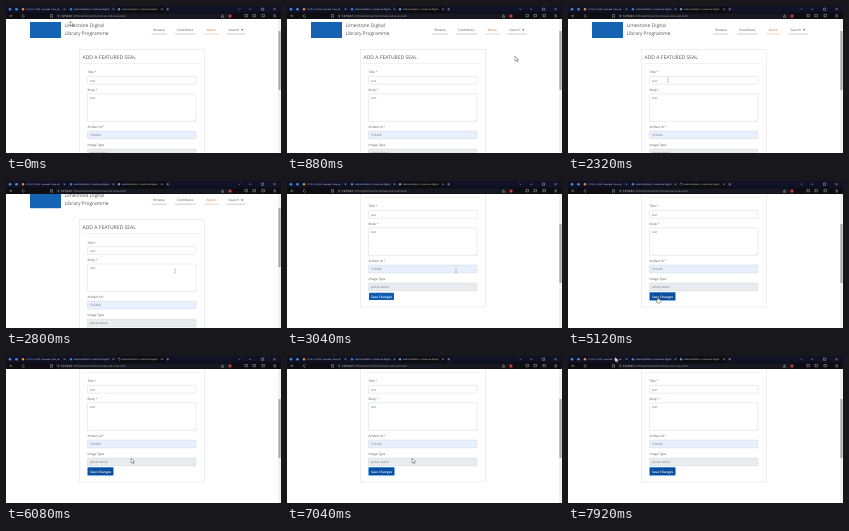
An HTML page that plays this animation: 275x147 px, repeating every 8000 ms.

```html
<!DOCTYPE html>
<html lang="en">
<head>
<meta charset="utf-8">
<title>Add a featured seal</title>
<style>
  html, body { margin: 0; width: 100%; height: 100%; overflow: hidden; background: #fff; }
  svg { display: block; width: 100vw; height: 100vh; }
  text { font-family: "Open Sans", "Noto Sans", sans-serif; text-rendering: geometricPrecision; white-space: pre; }
</style>
</head>
<body>
<svg viewBox="0 0 275 147">
  <clipPath id="view"><rect y="13" width="275" height="134"/></clipPath>
  <rect width="275" height="147" fill="#fff"/>
  <g clip-path="url(#view)"><g id="page"></g></g>
  <g id="chrome"></g>
  <g id="pointer">
    <path id="arrow" d="M0 0V5L1.2 4L2 5.8L2.8 5.4L2 3.7H3.6Z" fill="#fff" stroke="#333" stroke-width=".4"/>
    <path id="beam" d="M-.8-2H.8M0-2V2M-.8 2H.8" fill="none" stroke="#777" stroke-width=".35"/>
    <path id="hand" d="M-.6 0H.5V2L2.6 2.6V4.4L1.9 6H-.9L-2 3.5L-1.4 3L-.6 3.7Z" fill="#fff" stroke="#222" stroke-width=".4"/>
  </g>
</svg>
<script>
const $ = id => document.getElementById(id);
const page = $('page'), chrome = $('chrome');
const LOOP = 8000, STEP = 80;

function add(parent, tag, attrs, content) {
  const el = document.createElementNS('http://www.w3.org/2000/svg', tag);
  for (const k in attrs) el.setAttribute(k, attrs[k]);
  if (content) el.textContent = content;
  return parent.appendChild(el);
}
const rect = (g, x, y, width, height, fill, more) => add(g, 'rect', { x, y, width, height, fill, ...more });
const text = (g, x, y, size, fill, str, more) => add(g, 'text', { x, y, 'font-size': size, fill, ...more }, str);
const line = (g, d, stroke, w = .4) => add(g, 'path', { d, stroke, 'stroke-width': w, fill: 'none' });
const dot = (g, cx, cy, r, fill) => add(g, 'circle', { cx, cy, r, fill });

// Page header
rect(page, 24, 16, 31, 16, '#1763b3');
text(page, 58.5, 21, 4.9, '#555', 'Limestone Digital');
text(page, 58.5, 28.6, 4.9, '#555', 'Library Programme');
function navItem(label, x, w, color = '#555') {
  text(page, x, 25, 3.25, color, label);
  line(page, `M${x - 2} 28H${x + w + 2}`, color, .3);
}
navItem('Browse', 147.5, 11);
navItem('Contribute', 171, 17);
navItem('About', 200.5, 10, '#c8681e');
navItem('Search', 222.5, 15);
add(page, 'path', { d: 'M235 23.3H237.4L236.2 24.7Z', fill: '#555' });

// Form card
rect(page, 73.5, 43.5, 125, 123.5, '#fff', { stroke: '#ddd', 'stroke-width': .5 });
text(page, 76.5, 53, 5.05, '#555', 'ADD A FEATURED SEAL');
line(page, 'M76.5 57.5H194', '#ddd');

const inputs = [];
function field(label, y, h, value, fill = '#fff') {
  const t = text(page, 81.5, y - 3, 3.15, '#555', label);
  rect(page, 81.5, y, 108.5, h, fill, { rx: .6, stroke: '#c9ced4', 'stroke-width': .4 });
  text(page, 84, y + 5.2, 3.1, '#6c757d', value);
  if (label === 'Image Type') return;
  add(t, 'tspan', { fill: '#c46a6a' }, ' *');
  inputs.push([y, y + h]);
}
field('Title', 70.4, 7.8, 'test');
field('Body', 87.9, 27.5, 'test');
line(page, 'M188.2 114.7L189.5 113.4', '#999', .3);
field('Artifact Id', 125, 7.8, '532440', '#e8f0fe');
field('Image Type', 143, 7.8, 'photo detail', '#e9ecef');

const ring = rect(page, 81.2, 152, 26.6, 8.7, '#4c9be8', { rx: 1 });
const button = rect(page, 82, 152.8, 25, 7.1, '#0f5bb0', { rx: .5 });
text(page, 84, 157.5, 3.2, '#fff', 'Save Changes', { 'font-weight': 600 });

// Browser frame
rect(chrome, 0, 0, 275, 13, '#101228');
rect(chrome, 110, .4, 49, 7, '#0d0d12', { rx: 1 });
rect(chrome, 0, 6.5, 275, 6.5, '#0d0d12');
rect(chrome, 50, 7.4, 176, 5, '#181920', { rx: 1 });
const close = (x, r = .8) =>
  line(chrome, `M${x - r} ${3.2 - r}l${2 * r} ${2 * r}M${x - r} ${3.2 + r}l${2 * r} ${-2 * r}`, '#ddd');
function tab(x, color, title, size, end) {
  const mark = dot(chrome, x, 3.2, 1.2, color);
  text(chrome, x + 3, 4.1, size, '#eee', title);
  close(end);
  return mark;
}
const appTitle = 'AdminArtefacts - Limestone Digital';
for (const x of [4, 10.5]) dot(chrome, x, 3.2, 1.3, '#4a8fd8');
tab(17, '#e8932c', '127.0.0.1:2355 / mariadb / lime_db', 2.1, 58.5);
tab(65, '#3f83cf', appTitle, 2.2, 107.5);
const icon = tab(113, '#5c9bdc', appTitle, 2.2, 156);
const spinner = line(chrome, 'M113 2A1.2 1.2 0 1 1 111.8 3.2', '#8cb8ee', .5);
close(268.5, 1.1);
line(chrome, 'M160.5 3.2H163M161.75 2V4.4M232.5 2.6L233.5 3.6L234.5 2.6M243 3.2H245.4M255.5 2.1H257.7V4.3H255.5Z', '#ddd');
line(chrome, 'M6.5 9.9H3.8L5 8.7M3.8 9.9L5 11.1M18.5 9.1A1.3 1.3 0 1 0 18.7 10.4M44.5 8.5H46.5V11.5L45.5 10.6L44.5 11.5Z', '#ccc');
line(chrome, 'M215.5 9.5V11.3H217.5V9.5M216.5 10.4V8.3M267.5 8.9H270M267.5 9.9H270M267.5 10.9H270', '#ccc');
dot(chrome, 52.3, 9.9, .7, '#aaa');
dot(chrome, 224, 9.9, 1.5, '#d83b35');
for (const x of [239, 247, 256]) rect(chrome, x, 8.7, 2.2, 2.2, 'none', { stroke: '#ccc', 'stroke-width': .4 });
const url = text(chrome, 55, 10.9, 2.75, '#fff', '127.0.0.1');
add(url, 'tspan', { fill: '#9a9ca2' }, ':2354/admin/artifacts/featured-seals/add');
rect(chrome, 272, 13, 3, 134, '#f1f1f1');
const thumb = rect(chrome, 272.4, 25, 2.2, 59, '#aaa');

// Pointer moves: start, end, x, y
const moves = [
  [80, 880, 228, 50], [2080, 2320, 100, 74], [2320, 2800, 169, 90],
  [3440, 4240, 90, 116], [5440, 5840, 125, 102], [7120, 7920, 47, 1]
];

function ease(t, from, to) {
  const u = Math.min(1, Math.max(0, (t - from) / (to - from)));
  return u * u * (3 - 2 * u);
}
const show = (el, on) => el.setAttribute('visibility', on ? 'visible' : 'hidden');

function draw(t) {
  let x = 64, y = 15;
  for (const [from, to, mx, my] of moves) {
    const k = ease(t, from, to);
    x += (mx - x) * k;
    y += (my - y) * k;
  }
  const scroll = 41 * ease(t, 2735, 3040), py = y + scroll;
  page.setAttribute('transform', `translate(0 ${-scroll})`);
  thumb.setAttribute('y', 25 + scroll * .44);

  const hand = x > 82 && x < 107 && py > 152.5 && py < 160.5;
  const beam = x > 81.5 && x < 190 && inputs.some(([top, bottom]) => py > top && py < bottom);
  $('pointer').setAttribute('transform', `translate(${x} ${y})`);
  show($('hand'), hand);
  show($('beam'), beam);
  show($('arrow'), !hand && !beam);

  const clicked = t >= 4800;
  show(ring, clicked);
  button.setAttribute('fill', hand || clicked ? '#0b4f9e' : '#0f5bb0');

  const loading = t >= 5040 && t < 6960;
  show(icon, !loading);
  show(spinner, loading);
  spinner.setAttribute('transform', `rotate(${t * .4} 113 3.2)`);
}

function tick(now) {
  draw(Math.floor(now % LOOP / STEP) * STEP);
  requestAnimationFrame(tick);
}
draw(0);
requestAnimationFrame(tick);
</script>
</body>
</html>
```
